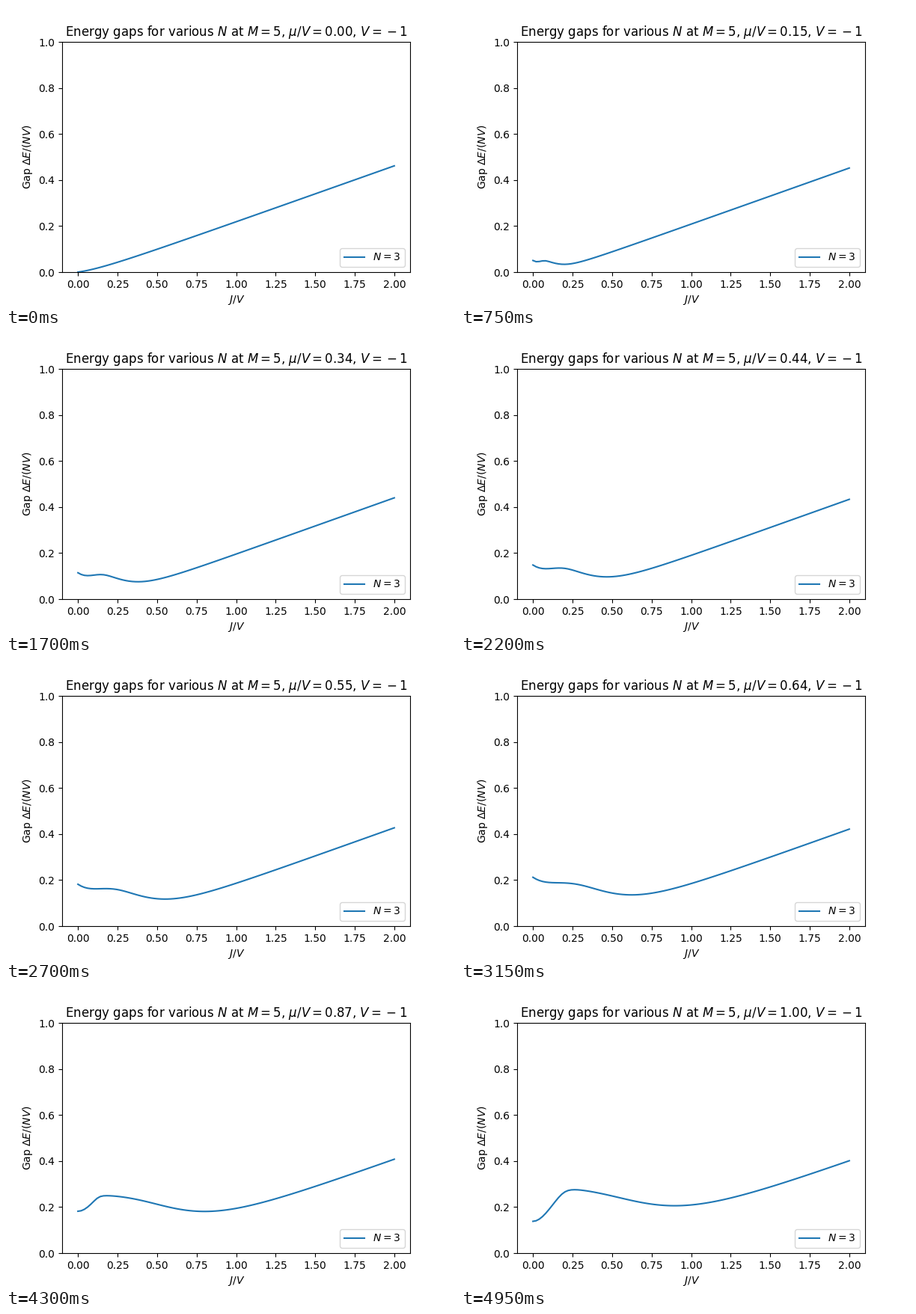
Animation of 600 by 400 pixels, one loop 5000 ms. Source, as a matplotlib script:

```python
"""Energy gap of N exchange-coupled molecules, each hopping over M internal levels."""
import itertools

import matplotlib.pyplot as plt
import numpy as np
from matplotlib.animation import FuncAnimation

N, M = 3, 5
V = -1
FRAMES, INTERVAL = 100, 50

ratios = np.linspace(0, 2, 100)       # J / V
potentials = np.linspace(0, 1, FRAMES)  # mu / V


def on_sites(ops):
    """Tensor product of single-molecule operators placed at given sites."""
    result = np.eye(1)
    for site in range(N):
        result = np.kron(result, ops.get(site, np.eye(M)))
    return result


def mirror_basis():
    """Orthonormal states that are even under reflection of the chain."""
    index = {s: i for i, s in enumerate(itertools.product(range(M), repeat=N))}
    columns = []
    for state, i in index.items():
        j = index[state[::-1]]
        if i <= j:
            column = np.zeros(M ** N)
            column[[i, j]] = 1
            columns.append(column / np.linalg.norm(column))
    return np.array(columns).T


def build_terms():
    """Hopping, exchange and edge-potential matrices in the even sector."""
    hop = np.eye(M, k=1) + np.eye(M, k=-1)
    edge = np.diag(np.eye(M)[0])
    hopping = sum(on_sites({i: hop}) for i in range(N))
    potential = sum(on_sites({i: edge}) for i in range(N))

    exchange = np.zeros((M ** N, M ** N))
    for i, n in itertools.product(range(N - 1), range(M - 1)):
        step = np.zeros((M, M))
        step[n, n + 1] = 1
        swap = on_sites({i: step, i + 1: step.T})
        exchange += swap + swap.T

    basis = mirror_basis()
    return [basis.T @ term @ basis for term in (hopping, exchange, potential)]


HOPPING, EXCHANGE, POTENTIAL = build_terms()


def gap_curve(mu):
    fixed = V * (EXCHANGE + mu * POTENTIAL)
    energies = np.linalg.eigvalsh(fixed + V * ratios[:, None, None] * HOPPING)
    return (energies[:, 1] - energies[:, 0]) / (N * abs(V))


curves = [gap_curve(mu) for mu in potentials]

fig, ax = plt.subplots(figsize=(6, 4), dpi=100)
line, = ax.plot(ratios, curves[0], label=f"$N = {N}$")
ax.set_ylim(0, 1)
ax.set_xlabel("$J/V$")
ax.set_ylabel(r"Gap $\Delta E/(NV)$")
ax.legend(loc="lower right")
title = ax.set_title("")


def update(frame):
    line.set_ydata(curves[frame])
    # The empty group keeps binary spacing around the minus sign.
    title.set_text(rf"Energy gaps for various $N$ at $M = {M}$, "
                   rf"$\mu/V = {potentials[frame]:.2f}$, $V = {{}}-{abs(V)}$")
    return line, title


anim = FuncAnimation(fig, update, frames=FRAMES, interval=INTERVAL,
                     repeat=True, repeat_delay=0)
plt.show()
```
